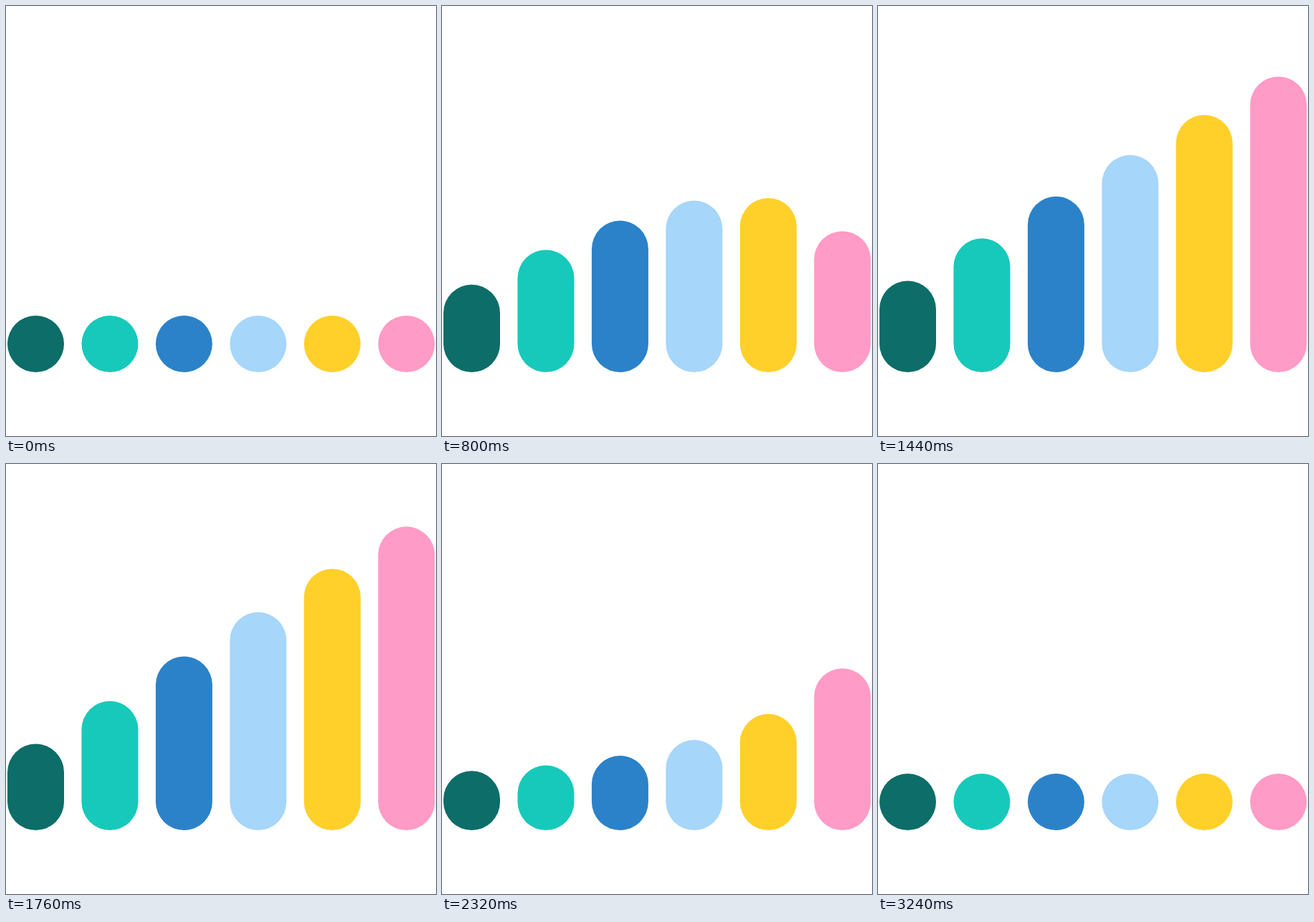
Recreate the animation shown at these times as an HTML page. Size 600 px wide and 600 px high, loop 3280 ms.

```html
<!DOCTYPE html>
<html lang="en">
<head>
<meta charset="utf-8">
<title>Rising bars</title>
<style>
html, body { margin: 0; height: 100%; overflow: hidden; background: #fff; }
svg { display: block; width: 100%; height: 100%; }
</style>
</head>
<body>
<svg id="stage" viewBox="0 0 600 600"></svg>
<script>
const COLORS = ['#0d6d68', '#17c9ba', '#2b82c9', '#a6d6fa', '#ffd02a', '#ff9bc6'];
const LOOP = 3280, STEP = 40, RISE = 1440, STAGGER = 80;
const SIZE = 79, BOTTOM = 511;
const stage = document.getElementById('stage');

const bars = COLORS.map((fill, i) => {
  const bar = document.createElementNS('http://www.w3.org/2000/svg', 'rect');
  const attrs = { x: 2 + 103.45 * i, width: SIZE, rx: SIZE / 2, fill };
  for (const name in attrs) bar.setAttribute(name, attrs[name]);
  return stage.appendChild(bar);
});

// cubic-bezier(.5, 0, 0, 1), solved by bisection
function ease(x) {
  if (x <= 0) return 0;
  if (x >= 1) return 1;
  let lo = 0, hi = 1;
  for (let n = 0; n < 24; n++) {
    const s = (lo + hi) / 2;
    if (1.5 * s * (1 - s) ** 2 + s ** 3 < x) lo = s; else hi = s;
  }
  return lo * lo * (3 - 2 * lo);
}

function draw(time) {
  const t = Math.floor((time % LOOP) / STEP) * STEP;
  bars.forEach((bar, i) => {
    const u = (t - STAGGER * i) / RISE;
    const height = SIZE + (48.5 + 59.3 * i) * (ease(u) - ease(u - 1));
    bar.setAttribute('y', BOTTOM - height);
    bar.setAttribute('height', height);
  });
}

const start = performance.now();
function tick() {
  draw(performance.now() - start);
  requestAnimationFrame(tick);
}
tick();
</script>
</body>
</html>
```
